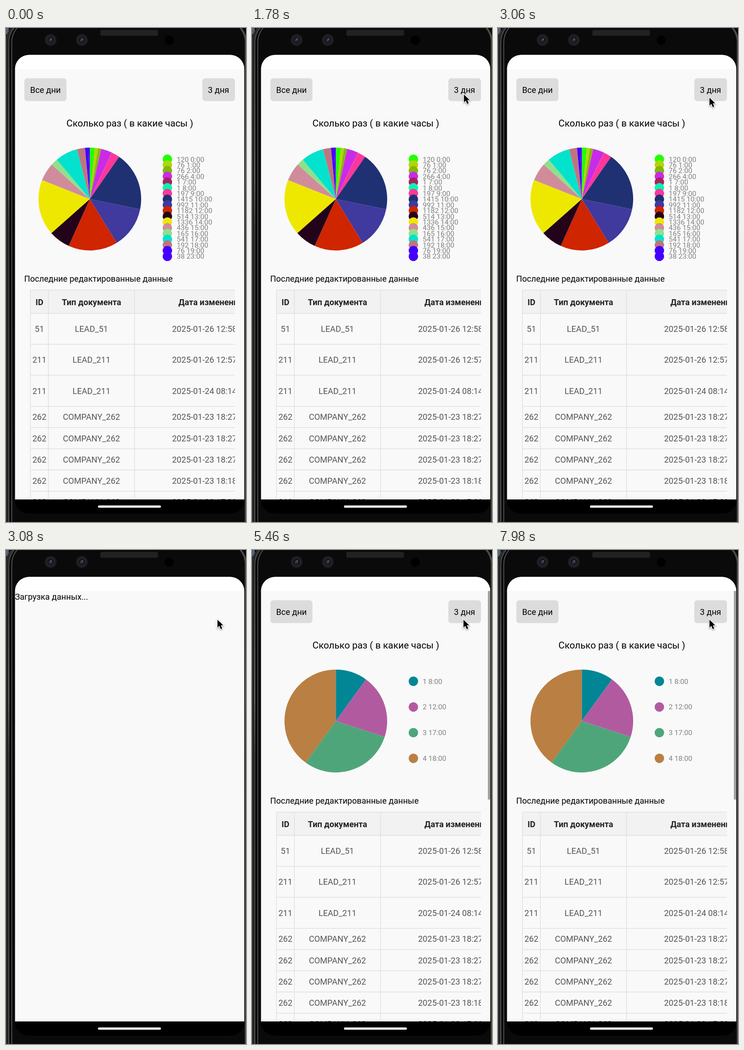
An HTML page with a canvas for the animation above (8000 ms loop, 522 by 1073 pixels).

```html
<!DOCTYPE html>
<html lang="ru">
<head>
<meta charset="utf-8">
<title>Статистика</title>
<style>
  html, body { margin: 0; width: 100%; height: 100%; overflow: hidden; background: #0a0a0a; }
  canvas { display: block; }
</style>
</head>
<body>
<canvas id="stage" width="522" height="1073"></canvas>
<script>
const ctx = document.getElementById('stage').getContext('2d');
const LOOP = 8000, LOAD_START = 3080, LOAD_END = 5440;
const BODY = 18.1, TITLE = 20.5, LEGEND = 15.5;

const allDays = [
  ['0:00', 120, '#22ff00'], ['1:00', 76, '#b3d40b'], ['2:00', 76, '#84b70c'],
  ['4:00', 266, '#c92be8'], ['7:00', 1, '#a8215f'], ['8:00', 1, '#05f5b0'],
  ['9:00', 197, '#ff369b'], ['10:00', 1415, '#1f3173'], ['11:00', 992, '#40399e'],
  ['12:00', 1182, '#cf2500'], ['13:00', 514, '#23031a'], ['14:00', 1336, '#eee800'],
  ['15:00', 436, '#d08c9b'], ['16:00', 165, '#90e08b'], ['17:00', 541, '#03e2cd'],
  ['18:00', 192, '#bf757f'], ['19:00', 76, '#4400ff'], ['23:00', 38, '#4400ff']
];
const threeDays = [
  ['8:00', 1, '#028696'], ['12:00', 2, '#b25aa0'],
  ['17:00', 3, '#4fa57a'], ['18:00', 4, '#ba7f42']
];
// id, type, date, row bottom
const rows = [
  ['51', 'LEAD_51', '2025-01-26 12:58', 687],
  ['211', 'LEAD_211', '2025-01-26 12:57', 754.4],
  ['211', 'LEAD_211', '2025-01-24 08:14', 821.7],
  ['262', 'COMPANY_262', '2025-01-23 18:27', 867.8],
  ['262', 'COMPANY_262', '2025-01-23 18:27', 913.9],
  ['262', 'COMPANY_262', '2025-01-23 18:27', 960],
  ['262', 'COMPANY_262', '2025-01-23 18:18', 1006],
  ['262', 'COMPANY_262', '2025-01-23 17:23', 1052]
];
// time, x, y of the pointer tip
const pointerPath = [
  [480, 524, 232], [860, 454, 178], [1080, 453, 177],
  [1660, 460, 143], [1800, 460, 143], [2500, 459, 150]
];

function text(str, x, y, size = BODY, color = '#000', align = 'left', weight = 400) {
  ctx.font = `${weight} ${size}px Roboto, sans-serif`;
  ctx.fillStyle = color;
  ctx.textAlign = align;
  ctx.fillText(str, x, y);
}

function rect(x, y, w, h, color) {
  ctx.fillStyle = color;
  ctx.fillRect(x, y, w, h);
}

function round(x, y, w, h, radii, color) {
  ctx.beginPath();
  ctx.roundRect(x, y, w, h, radii);
  ctx.fillStyle = color;
  ctx.fill();
}

function disc(x, y, r, color) {
  ctx.beginPath();
  ctx.arc(x, y, r, 0, Math.PI * 2);
  ctx.fillStyle = color;
  ctx.fill();
}

function rim(x, right, width, color) {
  ctx.beginPath();
  ctx.roundRect(x, -19, right - x, 1200, 51);
  ctx.lineWidth = width;
  ctx.strokeStyle = color;
  ctx.stroke();
}

function camera(x, y) {
  disc(x, y, 13, '#1b1c20');
  disc(x, y, 9.5, '#24262c');
  disc(x, y, 7, '#121317');
  disc(x, y, 4, '#2c2e36');
  disc(x + 1, y - 2, 1.3, '#777b85');
  disc(x - 2, y + 2, 1, '#555963');
}

function drawPhone() {
  rect(0, 0, 522, 1073, '#0a0a0a');
  rect(0, 0, 6, 14, '#526372');
  round(-2, -18, 526, 1200, 52, '#2a2a2a');
  const shine = ctx.createLinearGradient(0, 0, 0, 1073);
  shine.addColorStop(0, '#505050');
  shine.addColorStop(0.3, '#808080');
  shine.addColorStop(0.42, '#484848');
  shine.addColorStop(1, '#606060');
  round(4, -18, 517, 1200, 52, '#080808');
  rim(6, 522.5, 2, shine);
  rim(12.5, 520, 2, '#505050');
  round(14, -18, 505.5, 1200, 50, '#0a0a0a');

  round(205, 4, 126, 13, 4, '#1d1d1d');
  for (let x = 207; x < 330; x += 3) rect(x, 5, 1, 11, '#2b2b2b');
  camera(97, 26);
  camera(165, 26);
  disc(355, 26.5, 10, '#000');

  round(19, 58, 500, 997, 31, '#000');
  round(19.6, 58.4, 498.6, 965.6, [31, 31, 0, 0], '#f9f9f9');
  round(19.6, 58.4, 498.6, 30.6, [31, 31, 0, 0], '#fff');
  round(200, 1037, 137, 5, 2.5, '#f0f0f0');
}

function drawChart(data) {
  const cx = 182.3, cy = 371.5, r = 111.7;
  const total = data.reduce((sum, item) => sum + item[1], 0);
  const step = 223.3 / data.length;
  let angle = -Math.PI / 2;
  data.forEach(([hour, count, color], i) => {
    const end = angle + count / total * Math.PI * 2;
    ctx.beginPath();
    ctx.moveTo(cx, cy);
    ctx.arc(cx, cy, r, angle, end);
    ctx.fillStyle = color;
    ctx.fill();
    angle = end;
    const y = 285.1 + i * step;
    disc(351, y, 10.3, color);
    text(`${count} ${hour}`, 371.3, y + 5.4, LEGEND, '#7f7f7f');
  });
}

function drawTable() {
  const line = '#dfdfdf';
  ctx.save();
  ctx.beginPath();
  ctx.rect(40, 560, 458, 464);
  ctx.clip();
  rect(53, 569, 445, 51, '#f2f2f2');
  text('ID', 72.7, 601.7, BODY, '#222', 'center', 700);
  text('Тип документа', 186, 601.7, BODY, '#222', 'center', 700);
  text('Дата изменения', 375, 601.7, BODY, '#222', 'left', 700);
  let top = 620;
  for (const [id, type, date, bottom] of rows) {
    const y = (top + bottom) / 2 + 6.7;
    text(id, 72.7, y, BODY, '#555', 'center');
    text(type, 185.9, y, BODY, '#555', 'center');
    text(date, 361.2, y, BODY, '#555');
    rect(53, top - 0.7, 445, 1.4, line);
    top = bottom;
  }
  rect(53, 568.6, 445, 1.4, line);
  for (const x of [52.5, 91.5, 278.8]) rect(x, 569, 1.4, 460, line);
  ctx.restore();
}

function drawPage(data) {
  round(40, 109.3, 91.5, 49.5, 6, '#dcdcdc');
  round(427, 109.3, 71, 49.5, 6, '#dcdcdc');
  text('Все дни', 85.7, 141, BODY, '#000', 'center');
  text('3 дня', 462.3, 141, BODY, '#000', 'center');
  text('Сколько раз ( в какие часы )', 269.4, 213.6, TITLE, '#000', 'center');
  drawChart(data);
  text('Последние редактированные данные', 39.5, 551);
  drawTable();
}

function pointerAt(t) {
  const next = pointerPath.findIndex(p => p[0] > t);
  if (next === 0) return null;
  if (next < 0) return pointerPath[pointerPath.length - 1].slice(1);
  const [t0, x0, y0] = pointerPath[next - 1], [t1, x1, y1] = pointerPath[next];
  const u = (t - t0) / (t1 - t0), k = u * u * (3 - 2 * u);
  return [x0 + (x1 - x0) * k, y0 + (y1 - y0) * k];
}

function drawPointer([x, y]) {
  const arrow = new Path2D('M1 1.5V18.5L5 14.8L8 21.8L11.2 20.4L8.3 13.6H13.5Z');
  ctx.save();
  ctx.translate(x, y);
  ctx.shadowColor = 'rgba(0,0,0,.4)';
  ctx.shadowBlur = 3;
  ctx.shadowOffsetY = 1.5;
  ctx.lineWidth = 2.4;
  ctx.strokeStyle = '#fff';
  ctx.stroke(arrow);
  ctx.shadowColor = 'transparent';
  ctx.fillStyle = '#000';
  ctx.fill(arrow);
  ctx.restore();
}

function draw(now) {
  const t = now % LOOP;
  drawPhone();
  if (t < LOAD_START) {
    drawPage(allDays);
  } else if (t < LOAD_END) {
    text('Загрузка данных...', 19.5, 108.2);
  } else {
    drawPage(threeDays);
    rect(513, 89, 5, 453, '#a2a2a2');
  }
  const pointer = pointerAt(t);
  if (pointer) drawPointer(pointer);
}

function tick(now) {
  draw(now);
  requestAnimationFrame(tick);
}

draw(0);
requestAnimationFrame(tick);
</script>
</body>
</html>
```
